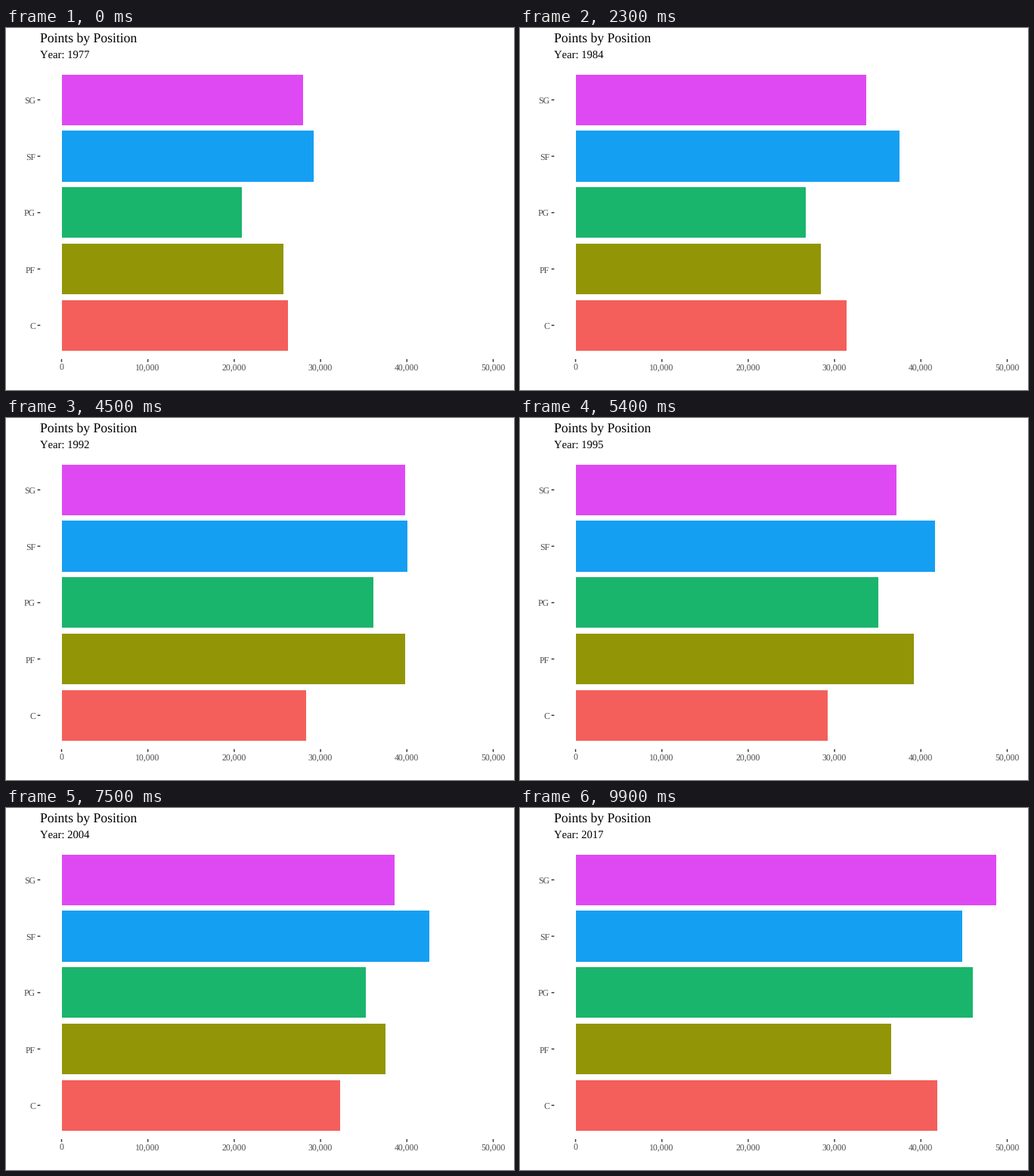
A matplotlib script for the animation above (10 s loop, 672 px wide and 480 px high).

```python
import matplotlib.pyplot as plt
import numpy as np
from matplotlib.animation import FuncAnimation
from matplotlib.patches import Rectangle

W, H, DPI = 672, 480, 100
FRAMES, INTERVAL = 100, 100
X0, PX_PER_K = 73.5, 11.42      # zero line and pixels per thousand points
ROW0, PITCH, BAR_H = 95.3, 74.75, 67.2
PANEL_LEFT, PANEL_BOTTOM = 45.3, 439.1
TICK, TICK_W = 3.7, 1.42
BAR_LEFT = 74

plt.rcParams.update({
    "font.family": "Liberation Serif",
    "text.hinting": "none",
    "text.kerning_factor": 20,  # effectively no kerning
})

# Two shortened seasons are left out.
YEARS = [y for y in range(1977, 2018) if y not in (1999, 2012)]

# Thousands of points at a few key seasons, straight lines between them.
KEYS = [0, 3.5, 10.5, 15, 21.5, 30.5, 38]
POSITIONS = {
    "SG": ("#df49f3", [28.0, 31.65, 35.15, 39.8, 34.1, 43.04, 48.73]),
    "SF": ("#159ff3", [29.2, 35.95, 38.75, 40.06, 43.48, 41.64, 44.79]),
    "PG": ("#1ab56c", [20.9, 26.4, 26.84, 36.12, 33.84, 36.65, 46.01]),
    "PF": ("#919506", [25.7, 24.82, 31.13, 39.8, 38.4, 36.56, 36.56]),
    "C": ("#f45f5b", [26.23, 29.64, 32.7, 28.33, 30.25, 34.37, 41.9]),
}

fig = plt.figure(figsize=(W / DPI, H / DPI), dpi=DPI, facecolor="white")
ax = fig.add_axes([0, 0, 1, 1])
ax.set(xlim=(0, W), ylim=(H, 0))
ax.axis("off")


def label(x, y, text, px, color="black", ha="left"):
    return ax.text(x, y, text, fontsize=px * 72 / DPI, color=color,
                   ha=ha, va="baseline")


def tick(xs, ys):
    ax.plot(xs, ys, color="#333333", lw=TICK_W * 72 / DPI,
            solid_capstyle="butt", snap=False)


label(PANEL_LEFT, 19, "Points by Position", 17.6)
subtitle = label(PANEL_LEFT, 41, "", 14.67)

for k in range(0, 60, 10):
    x = X0 + k * PX_PER_K
    tick([x, x], [PANEL_BOTTOM, PANEL_BOTTOM + TICK])
    label(x - 0.5, 454, f"{k * 1000:,}", 11.73, "#4d4d4d", "center")

bars = []
for i, (name, (color, _)) in enumerate(POSITIONS.items()):
    y = ROW0 + i * PITCH
    tick([PANEL_LEFT - TICK, PANEL_LEFT], [y, y])
    label(39, y + 5.4, name, 11.73, "#4d4d4d", "right")
    top, bottom = round(y - BAR_H / 2), round(y + BAR_H / 2)
    bar = Rectangle((BAR_LEFT, top), 0, bottom - top, fc=color, lw=0,
                    antialiased=False)
    bars.append(ax.add_patch(bar))


def season_at(frame):
    """Half-season steps: early seasons hold for two frames, later ones for one."""
    if frame < 69:
        return frame // 3 + (frame % 3 == 2) / 2
    return (frame - 23) / 2


def update(frame):
    season = season_at(frame)
    subtitle.set_text(f"Year: {YEARS[int(season)]}")
    for bar, (_, points) in zip(bars, POSITIONS.values()):
        value = np.interp(season, KEYS, points)
        bar.set_width(round(X0 + value * PX_PER_K) - BAR_LEFT)
    return [subtitle, *bars]


anim = FuncAnimation(fig, update, frames=FRAMES, interval=INTERVAL,
                     repeat=True, repeat_delay=0, blit=False)
plt.show()
```
